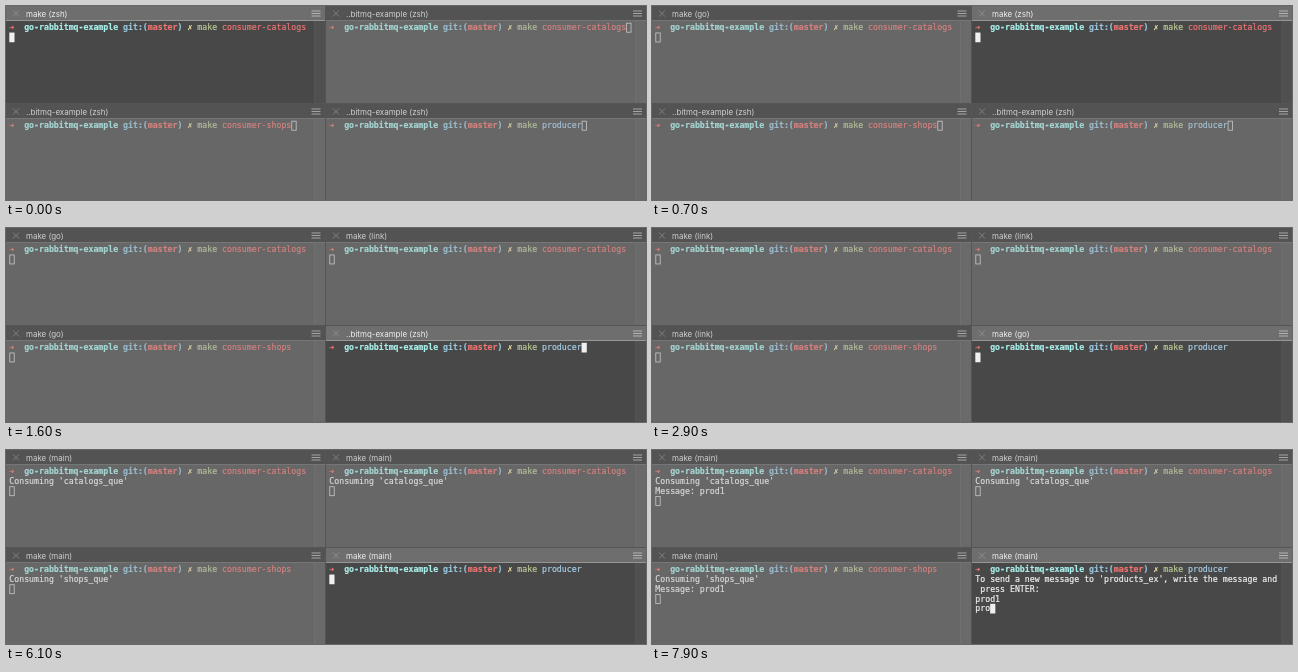
Write an HTML page with a canvas that moves like this. It is 640 by 194 pixels and loops after 8000 ms.

```html
<!DOCTYPE html>
<html lang="en">
<head>
<meta charset="utf-8">
<title>Four terminal panes</title>
<style>
html, body { margin: 0; width: 640px; height: 194px; overflow: hidden; background: #666; }
canvas { display: block; }
</style>
</head>
<body>
<canvas id="stage" width="640" height="194"></canvas>
<script>
const ctx = document.getElementById('stage').getContext('2d');
const LOOP = 8000, CHAR = 4.947, LINE = 9.75, LEFT = 3.3, FADE = 150;
const MONO = '8.22px "DejaVu Sans Mono", monospace';
const TITLE = '7.95px Inter, sans-serif';
const ZSH = '..bitmq-example (zsh)';

const RED = [234, 116, 114], CYAN = [168, 238, 234], BLUE = [152, 198, 222];
const YELLOW = [240, 226, 168], GREEN = [186, 202, 150], WHITE = [240, 240, 240];
const SKY = [166, 206, 232], GREY = [155, 155, 155];

// Each pane: focus span, time of Enter, titles as [start, text], output as [start, lines]
const panes = [
  { x: 0, y: 0, focus: [-FADE, 100], enter: 0, arg: 'consumer-catalogs',
    titles: [[0, 'make (zsh)'], [700, 'make (go)'], [1800, 'make (link)'], [5200, 'make (main)']],
    output: [[5200, ["Consuming 'catalogs_que'"]], [7500, ['Message: prod1']]] },
  { x: 320, y: 0, focus: [100, 700], enter: 500, arg: 'consumer-catalogs',
    titles: [[0, ZSH], [500, 'make (zsh)'], [900, 'make (go)'], [1500, 'make (link)'], [5500, 'make (main)']],
    output: [[5500, ["Consuming 'catalogs_que'"]]] },
  { x: 0, y: 98, focus: [700, 1150], enter: 1100, arg: 'consumer-shops',
    titles: [[0, ZSH], [1100, 'make (zsh)'], [1500, 'make (go)'], [2900, 'make (link)'], [5900, 'make (main)']],
    output: [[5900, ["Consuming 'shops_que'"]], [7500, ['Message: prod1']]] },
  { x: 320, y: 98, focus: [1150, Infinity], enter: 2000, arg: 'producer',
    titles: [[0, ZSH], [2000, 'make (zsh)'], [2500, 'make (go)'], [5800, 'make (main)']],
    output: [[6200, ["To send a new message to 'products_ex', write the message and", ' press ENTER:']],
             [7400, ['prod1']]],
    keys: [[6700, 'p'], [6800, 'pr'], [6900, 'pro'], [7000, 'prod'], [7200, 'prod1'], [7400, ''],
           [7700, 'p'], [7800, 'pr'], [7900, 'pro']] }
];

const clamp = v => Math.max(0, Math.min(1, v));
const mix = (a, b, k) => `rgb(${a.map((v, i) => Math.round(v + (b[i] - v) * k))})`;
const gray = (dim, lit, k) => mix([dim, dim, dim], [lit, lit, lit], k);
const latest = (steps, t) => steps.reduce((now, [start, value]) => t >= start ? value : now, '');

function rect(color, x, y, w, h) {
  ctx.fillStyle = color;
  ctx.fillRect(x, y, w, h);
}

function drawTitle(text, lit, inset) {
  rect(gray(83, 110, lit), 0, 0, 320, 14);
  rect(gray(118, 150, lit), 0, 14, 320, 1);
  ctx.strokeStyle = gray(132, 146, lit);
  ctx.lineWidth = 0.9;
  ctx.beginPath();
  ctx.moveTo(7, 4.5); ctx.lineTo(13, 10.5);
  ctx.moveTo(13, 4.5); ctx.lineTo(7, 10.5);
  ctx.stroke();
  for (let i = 0; i < 3; i++) rect(gray(165, 180, lit), 305.5 + inset, 4.5 + i * 2.5, 9, 1);
  ctx.font = TITLE;
  ctx.fillStyle = gray(208, 240, lit);
  ctx.fillText(text, 20, 10.5);
}

function drawPane(pane, t) {
  const [start, end] = pane.focus;
  const lit = clamp((t - start) / FADE) * (1 - clamp((t - end) / FADE));
  const inset = pane.x ? 1.5 : 0;
  const tone = color => mix(color, GREY, 0.3 * (1 - lit));
  const write = (text, col, row, color, bold) => {
    const x = LEFT + col * CHAR, y = 24.4 + row * LINE;
    ctx.font = (bold ? 'bold ' : '') + MONO;
    ctx.fillStyle = ctx.strokeStyle = tone(color);
    ctx.lineWidth = 0.2;
    ctx.fillText(text, x, y);
    ctx.strokeText(text, x, y);
  };

  ctx.save();
  ctx.translate(pane.x, pane.y);
  rect(gray(103, 72, lit), 0, 14, 320, 84);
  rect(gray(106, 80, lit), 308 + inset, 14, 12, 84);
  rect(gray(115, 88, lit), 308 + inset, 14, 0.7, 84);
  drawTitle(latest(pane.titles, t), lit, inset);

  write('➜', 0, 0, RED, true);
  write('go-rabbitmq-example', 3, 0, CYAN, true);
  write('git:(', 23, 0, BLUE, true);
  write('master', 28, 0, RED, true);
  write(')', 34, 0, BLUE, true);
  write('✗', 36, 0, YELLOW, true);
  write('make', 38, 0, GREEN);
  write(pane.arg, 43, 0, pane.arg === 'producer' ? SKY : RED);

  let row = 0, col = 43 + pane.arg.length;
  if (t >= pane.enter) {
    const lines = pane.output.filter(([time]) => t >= time).flatMap(([, text]) => text);
    const typed = latest(pane.keys || [], t);
    lines.push(typed);
    lines.forEach((line, i) => write(line, 0, i + 1, WHITE));
    row = lines.length;
    col = typed.length;
  }

  const cx = LEFT + col * CHAR, cy = 16.8 + row * LINE;
  if (lit > 0.5) {
    rect(tone(WHITE), cx, cy, 5.2, 9.7);
  } else {
    ctx.strokeStyle = gray(200, 235, lit);
    ctx.lineWidth = 0.8;
    ctx.strokeRect(cx + 0.5, cy + 0.4, 4.4, 9);
  }
  ctx.restore();
}

function frame() {
  const t = performance.now() % LOOP;
  panes.forEach(pane => drawPane(pane, t));
  rect('#555', 319, 0, 1, 194);
  rect('#555', 0, 97, 640, 1);
  requestAnimationFrame(frame);
}
frame();
</script>
</body>
</html>
```
